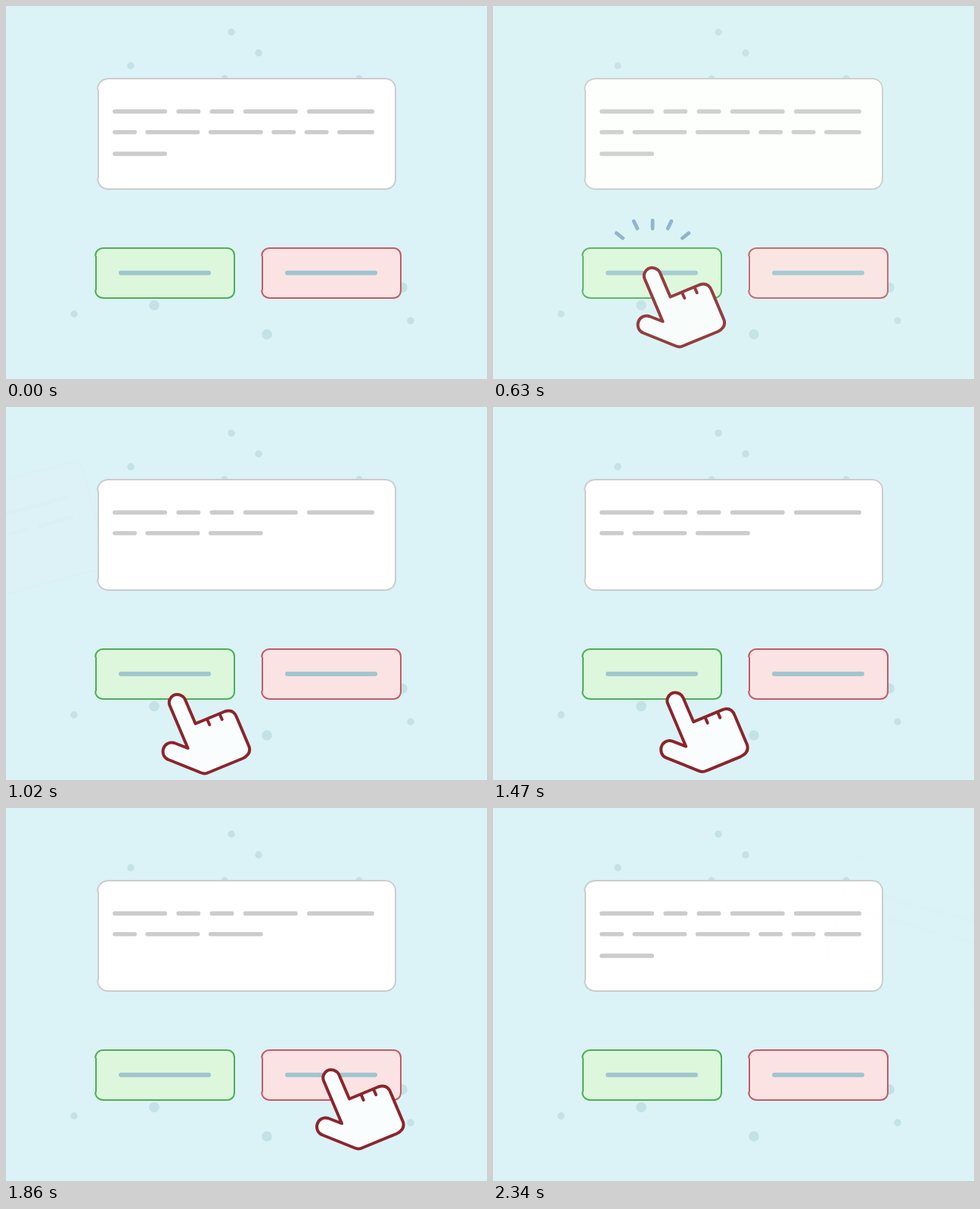
These frames come from a looping animation (636x493 px, 3.6 s). An HTML page:

```html
<!DOCTYPE html>
<html lang="en">
<head>
<meta charset="utf-8">
<title>Sort the cards</title>
<style>
  html, body { margin: 0; width: 100%; height: 100%; overflow: hidden; background: #dbf2f7; }
  svg { display: block; width: 100%; height: 100%; }
  path { stroke-linecap: round; stroke-linejoin: round; }
  .dots { fill: none; stroke: #c3e1e6; }
  .card { fill: #fff; stroke: #ccc; stroke-width: 2; }
  .text { fill: none; stroke: #ccc; stroke-width: 5.6; }
  .button { stroke-width: 2; }
  .yes { fill: #ddf7dd; stroke: #4fae54; }
  .no { fill: #fbe3e3; stroke: #c25b66; }
  .bar { fill: none; stroke: #a0c5cf; stroke-width: 6; }
  .hand { fill: #fafdfe; stroke: #8b252b; stroke-width: 4; }
  .sparks { fill: none; stroke: #90b5d0; stroke-width: 4.8; }
</style>
</head>
<body>
<svg viewBox="0 0 636 493">
  <path class="dots" stroke-width="9.4" d="M298 34.5h0M334 62h0M165 79h0M289 96h0M467 96h0M90 407h0M535 416h0"/>
  <path class="dots" stroke-width="13.6" d="M196 395.5h0M345 434h0M524 372h0"/>
  <path class="card"/>
  <path class="text" id="cardText"/>
  <g id="flyer">
    <path class="card"/>
    <path class="text" id="flyerText"/>
  </g>
  <path class="button yes"/>
  <path class="button no" transform="translate(220 0)"/>
  <path class="bar" d="M152 352.8h116m104 0h116"/>
  <g class="hand" id="hand">
    <path d="M216.5 394.5L240.5 451L222.5 444C216 442 209.5 446 208 452C206.5 458 209 464 214.5 466L258 483.5Q263 485.5 268 483L313 464.5Q324.5 459 321.5 449L305 410Q300.5 398.5 289 402.5L250.5 418.5L237 387C234 380.5 227 378.5 221.5 381C216.5 384 214.5 389.5 216.5 394.5Z"/>
    <path d="M266.5 414l2.7 6M283 407l2.7 6"/>
  </g>
  <rect id="tint" width="636" height="493"/>
  <path class="sparks" id="sparks"/>
</svg>
<script>
const LOOP = 3600, STEP = 30;
const $ = id => document.getElementById(id);

const clamp = v => Math.min(1, Math.max(0, v));
const span = (t, a, b) => clamp((t - a) / (b - a));
const smooth = (t, a, b) => (1 - Math.cos(Math.PI * span(t, a, b))) / 2;

// Squarish round corners; the two on the left bulge slightly outward.
function boxPath(x, y, w, h, r) {
  const k = r * .4, e = .8;
  return `M${x + r} ${y}h${w - 2 * r}c${r - k} 0 ${r} ${k} ${r} ${r}v${h - 2 * r}` +
    `c0 ${r - k} ${-k} ${r} ${-r} ${r}h${2 * r - w}c${k - r} 0 ${-r - e} ${-k} ${-r - e} ${-r}` +
    `l${e} -1v${2 + 2 * r - h}l${-e} -1c0 ${k - r} ${k + e} ${-r} ${r + e} ${-r}z`;
}
const shape = (selector, d) =>
  document.querySelectorAll(selector).forEach(el => el.setAttribute('d', d));
shape('.card', boxPath(122, 96, 393, 146, 14));
shape('.button', boxPath(119, 320, 183, 66, 10));

// Word lengths: short, long, and the one that fills up a justified line.
const [S, L, LEFT, WIDTH] = [32, 72, 141, 346];
function linePath(lengths, y, count = lengths.length) {
  const gap = (WIDTH - lengths.reduce((a, b) => a + b)) / Math.max(1, lengths.length - 1);
  let x = LEFT, d = '';
  for (const w of lengths.slice(0, count)) {
    d += `M${x + 2.8} ${y}h${w - 5.6}`;
    x += w + gap;
  }
  return d;
}
const first = linePath([L, S, S, L, 89], 139.4);
const second = count => linePath([S, L, L, S, S, 49], 166.7, count);
const longText = first + second() + linePath([L], 195.4);
const shortText = first + second(3);

const swipes = [
  { start: 660, last: 1020, end: 1440, dx: -403, dy: 23, turn: -15.6, color: '#ddf7dd', x: 211,
    before: longText, after: shortText },
  { start: 1950, last: 2340, end: LOOP, dx: 332, dy: 15, turn: 15.6, color: '#fbe3e3', x: 430,
    before: shortText, after: longText }
];

// A fan of five rays that shoot outward and shrink at their outer ends.
function sparkPath(u, x) {
  const head = 16 * (1 - span(u, -75, 15));
  const tail = 16 * (1 - span(u, -30, 90)) + 2.8;
  if (u < -75 || u > 105 || head >= tail) return '';
  let d = '';
  for (let k = -2; k <= 2; k++) {
    const place = k * .53, aim = k * .45, r = 50 + 6 * Math.abs(k);
    const at = s => `${x + r * Math.sin(place) - s * Math.sin(aim)} ` +
      `${325.5 - r * Math.cos(place) + s * Math.cos(aim)}`;
    d += `M${at(head)}L${at(tail)}`;
  }
  return d;
}

function drawHand(t) {
  const enter = smooth(t, 240, 519);
  const press = enter - smooth(t, 630, 900);
  const cross = smooth(t, 1410, 1758);
  const leave = smooth(t, 2055, 2340);
  const x = -16 * press + 203.5 * cross + 18 * leave;
  const y = -34 * (press + cross) + 44 * leave;
  $('hand').setAttribute('transform', `translate(${x} ${y})`);
  $('hand').setAttribute('opacity', enter - leave);
}

function drawFlyer(t, s) {
  const flying = t >= s.start && t < s.end;
  $('cardText').setAttribute('d', flying ? s.after : s.before);
  $('flyer').style.display = flying ? '' : 'none';
  const p = 1 - (1 - span(Math.min(t, s.last), s.start, s.start + 420)) ** 1.8;
  $('flyerText').setAttribute('d', s.before);
  $('flyer').setAttribute('opacity', 1 - p);
  $('flyer').setAttribute('transform',
    `translate(${s.dx * p} ${s.dy * p}) rotate(${s.turn * p} 318.5 169)`);
}

function render(t) {
  const s = swipes.find(swipe => t < swipe.end);
  const u = t - s.start;
  drawFlyer(t, s);
  drawHand(t);
  $('tint').setAttribute('fill', s.color);
  $('tint').setAttribute('opacity', .42 * (span(u, -60, 60) - span(u, 72, 300)));
  $('sparks').setAttribute('d', sparkPath(u, s.x));
}

const began = performance.now();
function tick() {
  const t = Math.max(0, performance.now() - began) % LOOP;
  render(Math.floor(t / STEP) * STEP);
  requestAnimationFrame(tick);
}
tick();
</script>
</body>
</html>
```
